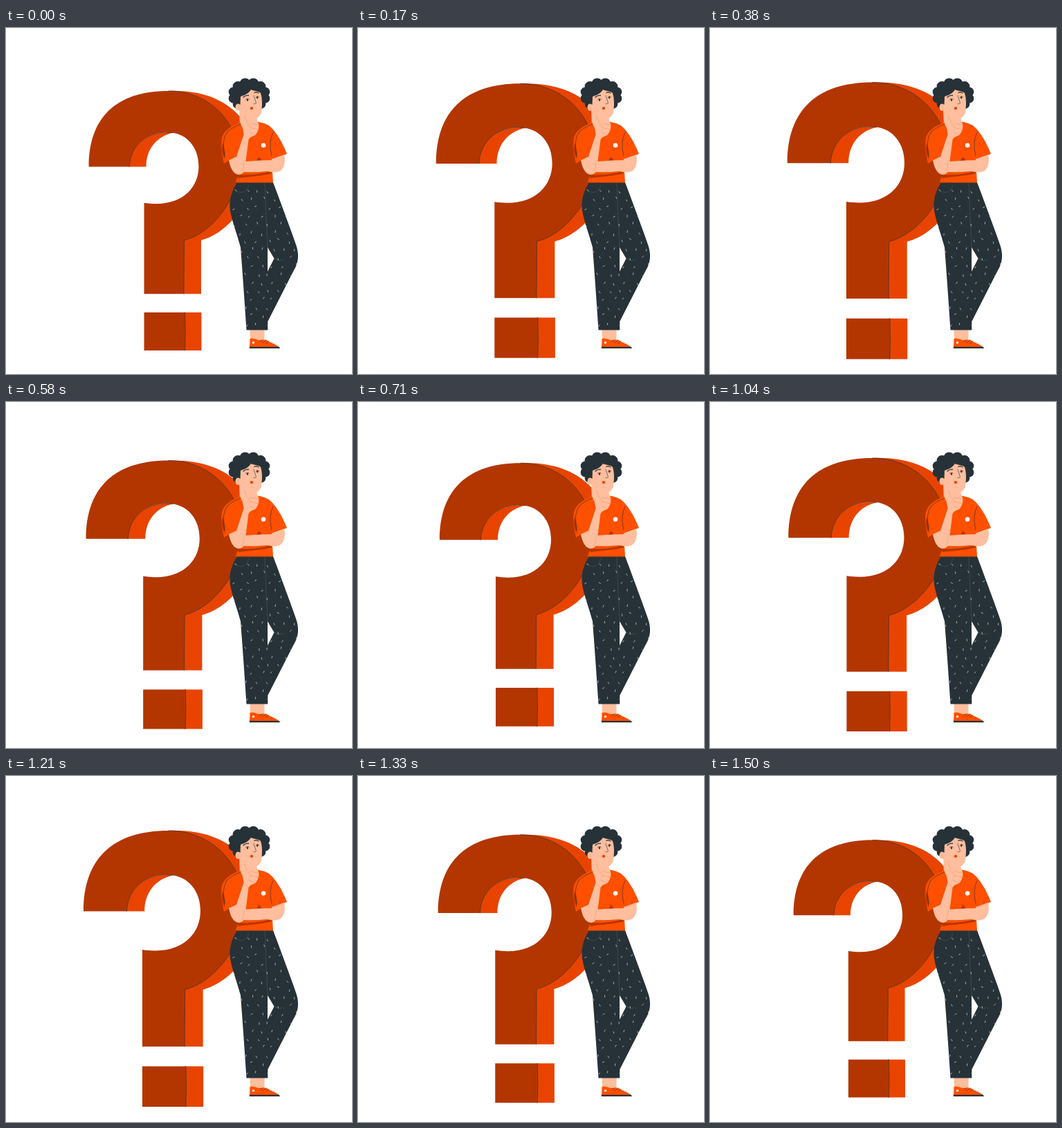
An HTML page for the animation above (1540 ms loop, 500 px wide and 500 px high).

```html
<!DOCTYPE html>
<html lang="en">
<head>
<meta charset="utf-8">
<title>Pondering</title>
<style>
  html, body { margin: 0; width: 100%; height: 100%; overflow: hidden; background: #fff; }
  svg { display: block; width: 100vw; height: 100vh; }
  .front, .shade { fill: #b33600; }
  .side { fill: #e84400; }
  .dark { fill: #263238; }
  .shirt { fill: #ff4f00; }
  .skin { fill: #ffbe9d; }
  .line, .seam, .fold, #flecks { fill: none; stroke-width: .6; stroke-linecap: round; stroke-linejoin: round; }
  .line { stroke: #263238; }
  .seam { stroke: #455a64; }
  .fold { stroke: #eb996e; }
  .brow { stroke-width: 1.3; }
  #flecks { stroke: #e0e4e6; stroke-width: .7; }
</style>
</head>
<body>
<svg viewBox="0 0 500 500" xmlns="http://www.w3.org/2000/svg">
  <defs>
    <path id="pants" d="M334 223H386C396 250 410 287 420 316C424 330 422 341 415 352L378.300 424V436.500H347.500C345 398 342 356 339 317C334 298 327 281 324 264C322 248 326 236 334 223ZM378 317V352L387.500 333Z" fill-rule="evenodd"/>
    <clipPath id="cloth"><use href="#pants" clip-rule="evenodd"/></clipPath>
  </defs>

  <g id="mark">
    <path class="side" d="M235 93C319 90 361 138 361 200C357 248 322 296 281.500 306.500V383H256V300L325 235V165Z"/>
    <path class="side" d="M178 201.300C179 172 202 149 241 153C218 158 203 176 203 201.300Z"/>
    <path class="front" d="M121 201.300C121 131 160 93 235 93C295 93 338 140 338 200C334 246 299 296 257.300 306.500L256.800 383H200V253C253 261 278 232 278 201C278 174 262 156 241 153C205 148 180 171 179 201.300Z"/>
    <path class="line" d="M235 93C295 93 338 140 338 200C334 246 299 296 257.300 306.500L256.800 383M179 201.300C180 171 205 148 241 153"/>
    <path class="side" d="M257 409.500H282V464H257Z"/>
    <path class="front" d="M200 409.500H258.500Q259.500 437 258.500 464H200Z"/>
    <path class="line" d="M258.500 409.500Q259.500 437 258.500 464"/>
  </g>

  <g id="legs">
    <path class="skin" d="M352.500 434H373.500V452H353Z"/>
    <path class="shirt" d="M352.500 449C358 447 362 451 367 451L376 450.500C382 455 391 457 395.500 462H352Z"/>
    <path class="dark" d="M351.800 460.800H394.500L396 463H351.800Z"/>
    <path class="line" d="M367 453L371 450.500M371 455L375 452M376 456L380 453"/>
    <circle cx="357.500" cy="454.800" r="1.700" fill="#fff"/>
    <use href="#pants" class="dark"/>
    <path class="seam" d="M332 236Q348 242 351 227M374 224L375 248C375 278 378 294 378 317M387.500 333Q395 337 402 335"/>
    <path id="flecks" clip-path="url(#cloth)"/>
  </g>

  <g id="body">
    <path class="skin" d="M337 115L338 143L352 154L365 141L361 125Z"/>
    <path class="shirt" d="M338.500 136.500C327 141 316 147 312.500 157C309.500 168 312 181 315 196L324 190L334 186L338 207L332 222Q333 224 337 223.500H386L384 190L406 182C400 167 392 151 380 141Q373 137 364 135.500C365 153 342 153 338.500 136.500Z"/>
    <path class="shade" d="M334 212C350 213 371 211 382 207L384 210C370 214 340 216 336 217ZM362 192Q366 182 369.500 192ZM313 166Q310 178 316 190Q318 178 313 166Z"/>
    <path class="line" d="M319 151Q311 164 316 184M386 151Q379 164 384 185M339 139Q327 143 319 151"/>
    <circle cx="372" cy="169.500" r="3.300" fill="#fff"/>
    <path class="skin" d="M384 189.500L402 183C404 191 403 201 397 206C391 210 385 208 377 207Q360 209 343 208L345 193Q365 191 384 191Z"/>
    <path class="skin" d="M322 191L333 186L343.500 154C344 150 338 130 338 125Q341 121 343 126L348 136Q355 129 361 133C368 137 366 149 360 155Q353 157 350.500 161L345 205C343 211 337 214 331 210C326 206 324 200 322 191Z"/>
    <path class="fold" d="M347 136Q353 141 354 145M353 138L365 140M354 144L364 147M352 151L359 154M344 193Q344 203 341 208"/>
  </g>

  <g id="head">
    <path id="hair" class="dark"/>
    <path class="skin" d="M339 99Q350 96 354 89C358 91 365 91 368 94C371 103 370 114 369 122C367 129 361 132 355 131C346 129 340 125 338.500 119Q332 122 331.500 114Q333 107 338.500 111Z"/>
    <path class="skin" d="M338 124Q341 121 343 126L349 139L344 146Z"/>
    <path class="line brow" d="M343 100Q346 97 350.500 97.500M359 93.500Q361.500 92 365 94"/>
    <path class="line" d="M358 97.500L361.500 108.500Q360 110.500 358 109.500M346 103.500Q348.500 100.500 351.500 103M361 100Q363 97.500 365.500 99.500"/>
    <ellipse class="dark" cx="349" cy="104" rx="1.200" ry="1.700"/>
    <ellipse class="dark" cx="363.300" cy="100.500" rx="1.200" ry="1.700"/>
    <ellipse class="side" cx="355" cy="116" rx="2.300" ry="1.900"/>
    <path class="fold" d="M334 112Q336 112 336 117M344 127L348 136"/>
  </g>
</svg>
<script>
  const LOOP = 1540, STEPS = 37, CX = 239.5, CY = 278.5, SWELL = .097;
  const el = id => document.getElementById(id);
  const disc = (x, y, rx, ry) =>
    `M${x - rx} ${y}a${rx} ${ry} 0 1 1 ${2 * rx} 0a${rx} ${ry} 0 1 1 ${-2 * rx} 0`;

  // Curls sit around an oval, open at the chin
  function hairPath() {
    let d = disc(351.5, 97, 23, 18);
    for (let deg = -225; deg <= 45; deg += 30) {
      const a = deg * Math.PI / 180;
      d += disc(351.5 + 23 * Math.cos(a), 97 + 18 * Math.sin(a), 7.6, 7.2);
    }
    return d;
  }

  // Flecks on a jittered grid; the trousers clip them
  function fleckPath() {
    let seed = 11, d = '';
    const rnd = () => (seed = seed * 16807 % 2147483647) / 2147483647;
    for (let y = 232, row = 0; y < 434; y += 12, row++) {
      for (let x = 328 + row % 2 * 8; x < 422; x += 16) {
        const a = .5 + 2.2 * rnd();
        d += `M${x + 6 * rnd()} ${y + 6 * rnd()}l${2.6 * Math.cos(a)} ${2.6 * Math.sin(a)}`;
      }
    }
    return d;
  }

  // Two beats per loop; valleys and peaks alternate, linear in between
  const turns = [-.8, 6, 21, 27, 36.2, 43];
  function scaleAt(step) {
    const i = turns.findIndex(t => t > step);
    const p = (step - turns[i - 1]) / (turns[i] - turns[i - 1]);
    return 1 + SWELL * (i % 2 ? p : 1 - p);
  }

  function draw(ms) {
    const s = scaleAt(Math.floor((ms + 4) % LOOP * STEPS / LOOP));
    el('mark').setAttribute('transform',
      `translate(${CX} ${CY}) scale(${s}) translate(${-CX} ${-CY})`);
  }

  function tick() {
    draw(performance.now());
    requestAnimationFrame(tick);
  }

  el('hair').setAttribute('d', hairPath());
  el('flecks').setAttribute('d', fleckPath());
  tick();
</script>
</body>
</html>
```
